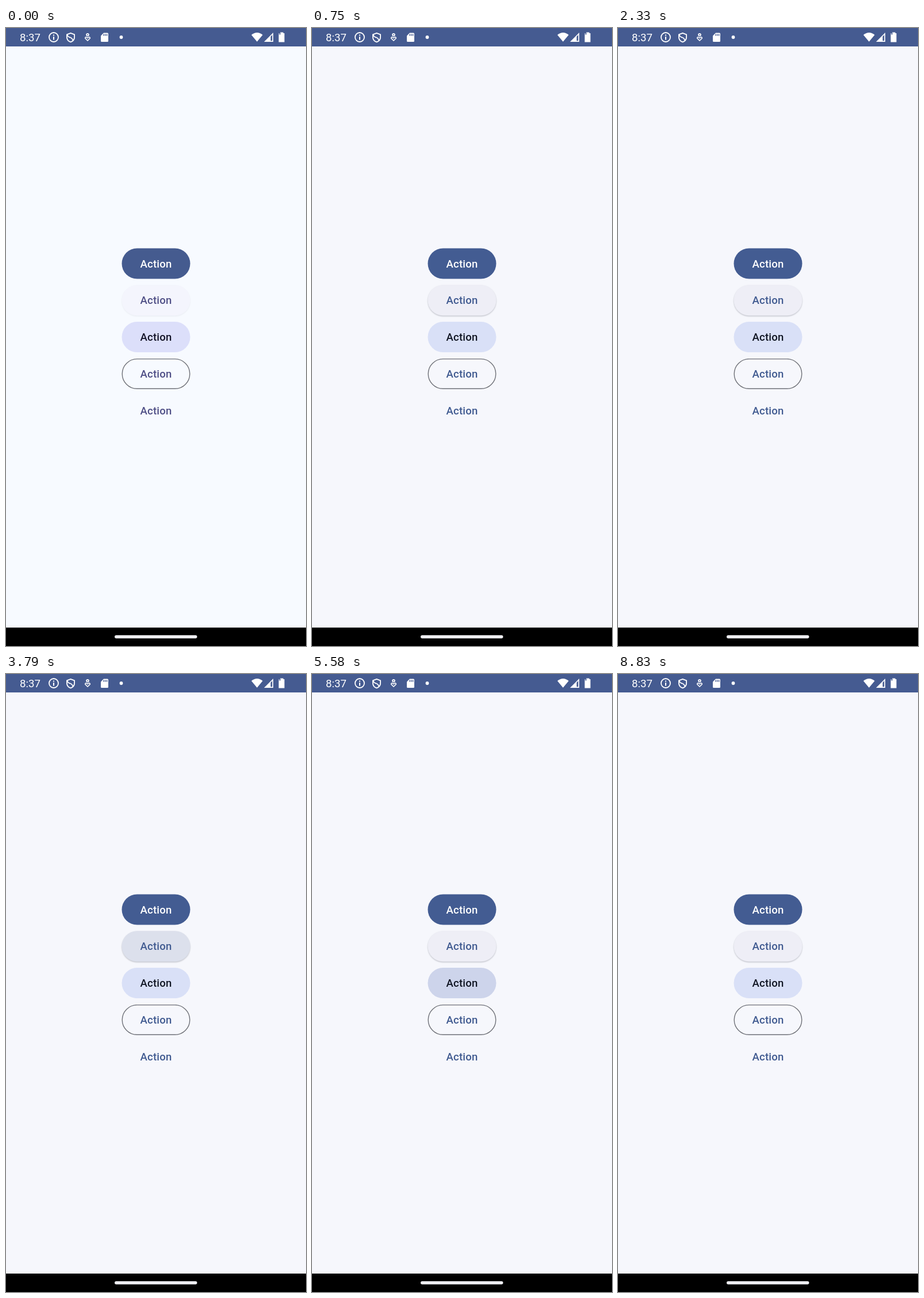
These frames come from a looping animation (522 by 1073 pixels, 8870 ms). An HTML page:

```html
<!DOCTYPE html>
<html lang="en">
<head>
<meta charset="utf-8">
<title>Buttons</title>
<style>
  html, body { margin: 0; width: 100%; height: 100%; overflow: hidden; background: #f6f7fc; }
  svg { display: block; width: 100%; height: 100%; }
  text { font-family: Roboto, sans-serif; }
  .label { font-size: 18.6px; font-weight: 500; letter-spacing: .13px; text-anchor: middle; }
  .line { fill: none; stroke: #fff; stroke-width: 1.8; stroke-linejoin: round; }
</style>
</head>
<body>
<svg viewBox="0 0 522 1073" preserveAspectRatio="none">
  <defs>
    <filter id="soft" x="-10%" y="-20%" width="120%" height="140%">
      <feGaussianBlur stdDeviation="1"/>
    </filter>
  </defs>
  <rect id="page" width="522" height="1073"/>
  <g id="buttons"></g>

  <rect width="522" height="32" fill="#455b91"/>
  <g fill="#fff">
    <text x="24" y="23" font-size="18.7">8:37</text>
    <circle class="line" cx="83" cy="16" r="8"/>
    <path d="M82 15h2v5.5h-2zM82 11.5h2v2h-2z"/>
    <path class="line" d="M112.5 8.8l6.6 2.5v4.7c0 4-2.8 7-6.6 8.4c-3.8-1.4-6.6-4.4-6.6-8.4v-4.7z"/>
    <path class="line" d="M106.5 11c.5 4.5 3 4.500 5.500 5.500s4 2.500 4.500 5.500"/>
    <circle class="line" cx="142" cy="11.800" r="1.900" stroke-width="1.600"/>
    <path class="line" style="stroke-width:1.600" d="M142 22l-4.300-4.200q.3-3 2.600-1.700l1.700 1.400l1.700-1.400q2.300-1.300 2.600 1.700z"/>
    <path d="M170 8.500h6.500q1.500 0 1.500 1.500v12.500q0 1.500-1.500 1.500h-10q-1.500 0-1.500-1.500v-9z"/>
    <path d="M169.500 10.500h1.500v3h-1.500zM172.200 10.500h1.500v3h-1.500zM174.900 10.500h1.500v3h-1.500z" fill="#455b91"/>
    <circle cx="200.500" cy="16" r="2.900"/>
    <path d="M427 12q10-8 19.600 0l-9.800 11.800z"/>
    <path d="M449 24l16-16v16zM460.500 14.800v7.500h2.800v-10.300z" fill-rule="evenodd"/>
    <path d="M477 7.500h5.500v1.500h2v15.500h-10v-15.500h2.500z"/>
    <path d="M474.500 9h2.500v-1.500h1v4h-3.500z" fill="#8b99bb"/>
  </g>

  <rect y="1041" width="522" height="32" fill="#000"/>
  <rect x="189" y="1054.200" width="143.500" height="5.600" rx="2.800" fill="#f0f0f4"/>
</svg>
<script>
const LOOP = 8870, SETTLE = 400;
const LEFT = 201.5, WIDTH = 119, HEIGHT = 53, FIRST = 382.5, STEP = 63.8;
const GROW = 225, FADE_IN = 75, FADE_OUT = 150;
const BLUE = [65, 91, 145], MAUVE = [80, 80, 135];

// down and up are the press times; text and fill run from the opening tint to the settled one
const specs = [
  { fill: [[69, 91, 143], [67, 92, 146]], text: [[255, 255, 255], [255, 255, 255]], ink: '#fff', alpha: .1, down: 1780, up: 2050 },
  { fill: [[244, 245, 253], [238, 238, 246]], text: [MAUVE, BLUE], ink: '#415f91', alpha: .1, down: 3500, up: 3820, shadow: true },
  { fill: [[220, 223, 250], [217, 224, 247]], text: [[20, 20, 40], [17, 22, 36]], ink: '#131c2b', alpha: .06, down: 5270, up: 5590 },
  { border: '#6f7178', text: [MAUVE, BLUE], ink: '#415f91', alpha: .1, down: 7110, up: 7400 },
  { text: [MAUVE, BLUE], ink: '#415f91', alpha: .1, down: 8020, up: 8280 }
];
const pageTint = [[247, 250, 255], [246, 247, 252]];

const $ = id => document.getElementById(id);
const clamp = v => Math.max(0, Math.min(1, v));
const mix = ([a, b], k) => `rgb(${a.map((v, i) => Math.round(v + (b[i] - v) * k))})`;

function add(parent, tag, attrs) {
  const el = document.createElementNS('http://www.w3.org/2000/svg', tag);
  for (const key in attrs) el.setAttribute(key, attrs[key]);
  return parent.appendChild(el);
}

const buttons = specs.map((spec, i) => {
  const root = $('buttons'), y = FIRST + i * STEP, mid = y + HEIGHT / 2;
  const pill = { x: LEFT, y, width: WIDTH, height: HEIGHT, rx: HEIGHT / 2 };
  const clip = add(document.querySelector('defs'), 'clipPath', { id: 'clip' + i });
  add(clip, 'rect', pill);
  const shadow = spec.shadow && add(root, 'rect', { ...pill, y: y + 1.3, fill: '#555a68', filter: 'url(#soft)' });
  const body = add(root, 'rect', { ...pill, fill: 'none' });
  const ripple = add(root, 'circle', { cx: LEFT + WIDTH / 2, cy: mid, fill: spec.ink, 'clip-path': `url(#clip${i})` });
  if (spec.border) {
    add(root, 'rect', {
      x: LEFT + .7, y: y + .7, width: WIDTH - 1.4, height: HEIGHT - 1.4,
      rx: HEIGHT / 2 - .7, fill: 'none', stroke: spec.border, 'stroke-width': 1.4
    });
  }
  const label = add(root, 'text', { x: 261, y: mid + 6.5, class: 'label' });
  label.textContent = 'Action';
  return { ...spec, shadow, body, ripple, label };
});

function draw(t) {
  const k = clamp(t / SETTLE);
  $('page').setAttribute('fill', mix(pageTint, k));
  for (const b of buttons) {
    if (b.fill) b.body.setAttribute('fill', mix(b.fill, k));
    if (b.shadow) b.shadow.setAttribute('opacity', .08 + .27 * k);
    b.label.setAttribute('fill', mix(b.text, k));
    const grow = 1 - (1 - clamp((t - b.down) / GROW)) ** 2;
    const fade = clamp((t - b.down) / FADE_IN) * (1 - clamp((t - b.up) / FADE_OUT));
    b.ripple.setAttribute('r', 36 + 42 * grow);
    b.ripple.setAttribute('opacity', b.alpha * fade);
  }
}

const start = performance.now();
function tick() {
  draw((performance.now() - start) % LOOP);
  requestAnimationFrame(tick);
}
tick();
</script>
</body>
</html>
```
